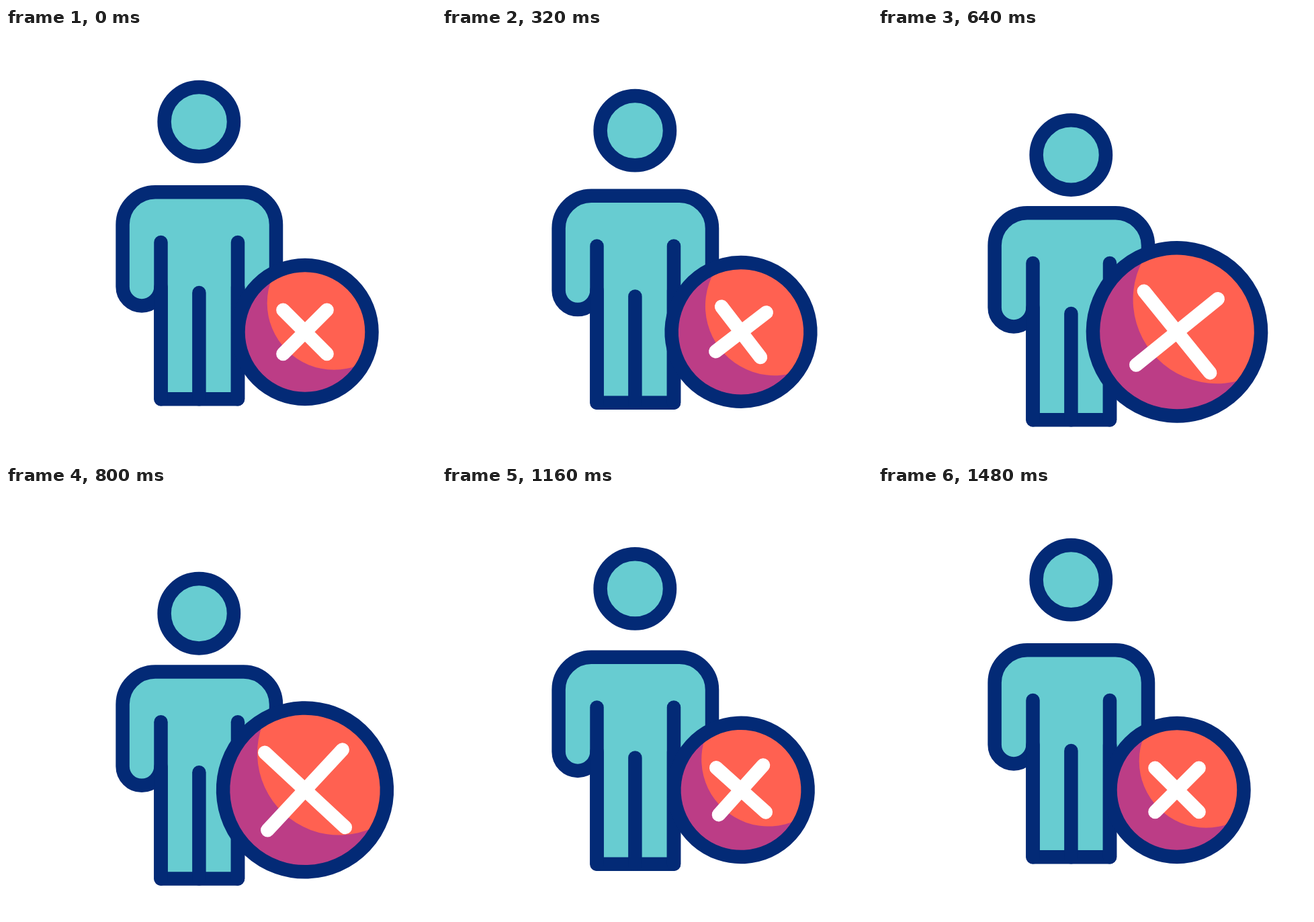
An HTML page with a canvas that plays this animation: 640 by 640 pixels, repeating every 1680 ms.

```html
<!DOCTYPE html>
<html lang="en">
<head>
<meta charset="utf-8">
<title>Person declined</title>
<style>
  html, body { margin: 0; width: 100%; height: 100%; overflow: hidden; background: #fff; }
  canvas { display: block; width: 640px; height: 640px; }
</style>
</head>
<body>
<canvas id="stage" width="640" height="640"></canvas>
<script>
const ctx = document.getElementById('stage').getContext('2d');
const LOOP = 1680, STEP = 40, LINE = 20.5;
const NAVY = '#032a76', TEAL = '#67ccd1', CORAL = '#ff6151', PLUM = '#bc3d86';

// Smooth 0..1 progress between two times
function ease(t, from, to) {
  const x = Math.min(1, Math.max(0, (t - from) / (to - from)));
  return x * x * x * (x * (6 * x - 15) + 10);
}

// Rises to 1 and returns to 0
function swell(t, riseFrom, riseTo, fallFrom, fallTo) {
  return ease(t, riseFrom, riseTo) - ease(t, fallFrom, fallTo);
}

function circle(x, y, r) {
  ctx.beginPath();
  ctx.arc(x, y, r, 0, Math.PI * 2);
}

function line(x1, y1, x2, y2) {
  ctx.beginPath();
  ctx.moveTo(x1, y1);
  ctx.lineTo(x2, y2);
  ctx.stroke();
}

function paint(fill) {
  ctx.fillStyle = fill;
  ctx.fill();
  ctx.stroke();
}

function drawHead(dy) {
  circle(287.3, 139.6 + dy, 51.7);
  paint(TEAL);
}

function drawBody(dy) {
  const left = 173.6, right = 402, top = 244.3, foot = 552.3;
  const legL = 230.5, legR = 345, hand = 385, corner = 48.5, palm = 28.45;
  ctx.save();
  ctx.translate(0, dy);
  ctx.beginPath();
  ctx.moveTo(legL, foot);
  ctx.lineTo(legL, hand);
  ctx.arc(left + palm, hand, palm, 0, Math.PI);
  ctx.arcTo(left, top, left + corner, top, corner);
  ctx.arcTo(right, top, right, top + corner, corner);
  ctx.arc(right - palm, hand, palm, 0, Math.PI);
  ctx.lineTo(legR, foot);
  ctx.closePath();
  paint(TEAL);
  line(legL, 319, legL, foot);
  line(legR, 319, legR, foot);
  line(287.4, 394, 287.4, foot);
  ctx.restore();
}

function drawBadge(radius, angle, arm) {
  ctx.save();
  ctx.translate(445, 452.4);
  ctx.rotate(angle);

  circle(0, 0, radius);
  ctx.fillStyle = PLUM;
  ctx.fill();
  ctx.save();
  ctx.clip();
  const shift = radius * 0.434;
  circle(shift, -shift, radius);
  ctx.fillStyle = CORAL;
  ctx.fill();
  ctx.restore();
  circle(0, 0, radius);
  ctx.stroke();

  const d = arm * Math.SQRT1_2;
  ctx.strokeStyle = '#fff';
  line(-d, -d, d, d);
  line(-d, d, d, -d);
  ctx.restore();
}

function draw(t) {
  ctx.fillStyle = '#fff';
  ctx.fillRect(0, 0, 640, 640);
  ctx.strokeStyle = NAVY;
  ctx.lineWidth = LINE;
  ctx.lineCap = ctx.lineJoin = 'round';

  drawHead(50.6 * swell(t, 84, 732, 733, 1408));
  drawBody(32.3 * swell(t, 130, 750, 780, 1417));

  const degrees = 10 * ease(t, 90, 450) - 14.7 * ease(t, 450, 960) + 4.7 * ease(t, 960, 1440);
  drawBadge(
    99.5 + 25.6 * swell(t, 180, 660, 650, 1210),
    degrees * Math.PI / 180,
    46.1 + 35.7 * swell(t, 223, 778, 772, 1283)
  );
}

const start = performance.now();
function tick() {
  const t = (performance.now() - start) % LOOP;
  draw(Math.floor(t / STEP) * STEP);
  requestAnimationFrame(tick);
}
tick();
</script>
</body>
</html>
```
